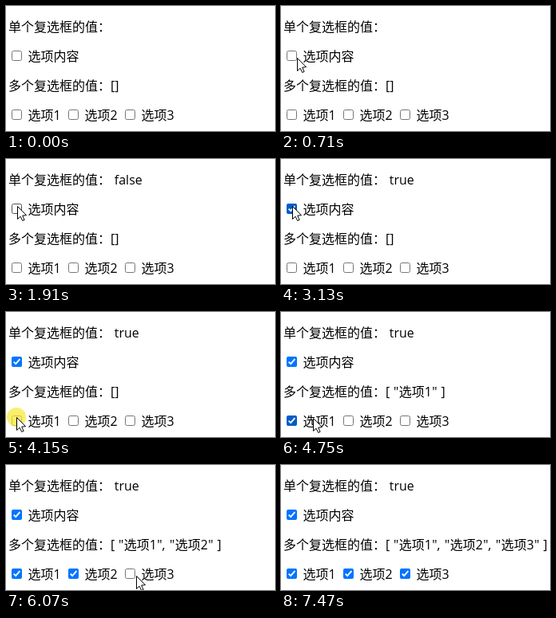
An HTML page with a canvas that plays this animation: 337x157 px, repeating every 8090 ms.

```html
<!DOCTYPE html>
<html lang="zh-CN">
<head>
<meta charset="utf-8">
<style>
html, body { margin: 0; width: 100%; height: 100%; overflow: hidden; background: #fff; }
canvas { display: block; }
</style>
</head>
<body>
<canvas id="stage" width="337" height="157"></canvas>
<script>
const ctx = document.getElementById('stage').getContext('2d', { alpha: false });
const LOOP = 8090;
const PITCH = 71;

// start, interval, steps, x, y, ease-out power
const moves = [
  [210, 100, 1, 88, 135, 1],
  [310, 100, 7, 14, 59, 2],
  [3430, 104, 6, 13, 132, 1.4],
  [4450, 100, 4, 40, 133, 1],
  [4850, 100, 5, 84, 136, 1.4],
  [5550, 104, 6, 163, 139, 1.4],
  [6270, 100, 1, 156, 137, 1],
  [6570, 100, 1, 215, 150, 1],
  [7370, 100, 1, 335, 156, 1]
];
const singleClicks = [1210, 1910, 3130];
const optionClicks = [4250, 5450, 6470];
const clicks = singleClicks.concat(optionClicks);
const PRESS = 100;

function cursorAt(t) {
  if (t < 210 || (t >= 6670 && t < 7370) || t >= 7470) return null;
  let x = 88, y = 135;
  for (const [start, interval, steps, tx, ty, power] of moves) {
    if (t < start) break;
    const step = Math.min(steps, Math.floor((t - start) / interval) + 1);
    const p = 1 - Math.pow(1 - step / steps, power);
    x += (tx - x) * p;
    y += (ty - y) * p;
  }
  return { x: Math.round(x), y: Math.round(y) };
}

function text(s, x, baseline) {
  ctx.fillStyle = '#000';
  ctx.fillText(s, x, baseline);
}

function checkbox(x, y, checked, hover) {
  ctx.beginPath();
  if (checked) {
    ctx.roundRect(x, y, 13, 13, 2);
    ctx.fillStyle = hover ? '#005cc8' : '#0075ff';
    ctx.fill();
    ctx.beginPath();
    ctx.moveTo(x + 2.7, y + 6.6);
    ctx.lineTo(x + 5.2, y + 9.2);
    ctx.lineTo(x + 10.4, y + 3.2);
    ctx.strokeStyle = '#fff';
    ctx.lineWidth = 1.9;
  } else {
    ctx.roundRect(x + 0.5, y + 0.5, 12, 12, 2);
    ctx.strokeStyle = hover ? '#4f4f4f' : '#767676';
    ctx.lineWidth = 1;
  }
  ctx.stroke();
}

function option(label, x, y, checked, cursor) {
  const width = ctx.measureText(label).width;
  const dx = cursor ? cursor.x - x : -1;
  const hover = cursor && cursor.y >= y - 2 && cursor.y < y + 15 &&
    ((dx >= 0 && dx < 13) || (dx >= 21 && dx < 21 + width));
  checkbox(x, y, checked, hover);
  text(label, x + 20.5, y + 13);
}

function list(count) {
  if (!count) return text('[]', 131, 106);
  text('[', 131, 106);
  for (let i = 0; i < count; i++) {
    const x = 141 + 64 * i;
    text('"', x, 106);
    text('选项' + (i + 1), x + 6.8, 106);
    text(i < count - 1 ? '",' : '"', x + 48.2, 106);
  }
  text(']', 136.5 + 64 * count, 106);
}

function pointer({ x, y }) {
  ctx.save();
  ctx.translate(x + 0.5, y + 0.5);
  ctx.beginPath();
  ctx.moveTo(0, 0);
  ctx.lineTo(0, 16);
  ctx.lineTo(3.6, 12.7);
  ctx.lineTo(6.2, 18);
  ctx.lineTo(8.6, 17);
  ctx.lineTo(6.2, 11.6);
  ctx.lineTo(11, 11.2);
  ctx.closePath();
  ctx.fillStyle = '#fff';
  ctx.fill();
  ctx.strokeStyle = '#000';
  ctx.lineWidth = 1;
  ctx.stroke();
  ctx.restore();
}

function draw(t) {
  const cursor = cursorAt(t);
  const toggles = singleClicks.filter(c => t >= c).length;
  const checked = toggles % 2 === 1;
  const chosen = optionClicks.filter(c => t >= c).length;

  ctx.fillStyle = '#fff';
  ctx.fillRect(0, 0, 337, 157);
  ctx.font = '16px "Open Sans", "Noto Sans CJK SC", "Noto Sans CJK", sans-serif';

  text('单个复选框的值：', 3, 32);
  if (toggles) text(String(checked), 135.8, 32);
  option('选项内容', 7, 56, checked, cursor);
  text('多个复选框的值：', 3, 106);
  list(chosen);
  for (let i = 0; i < 3; i++) {
    option('选项' + (i + 1), 7 + PITCH * i, 130, i < chosen, cursor);
  }

  if (!cursor) return;
  if (clicks.some(c => t >= c - PRESS && t < c)) {
    ctx.beginPath();
    ctx.arc(cursor.x, cursor.y, 12, 0, Math.PI * 2);
    ctx.fillStyle = 'rgba(248, 234, 60, 0.75)';
    ctx.fill();
  }
  pointer(cursor);
}

const begin = performance.now();
function tick() {
  draw((performance.now() - begin) % LOOP);
  requestAnimationFrame(tick);
}
tick();
</script>
</body>
</html>
```
